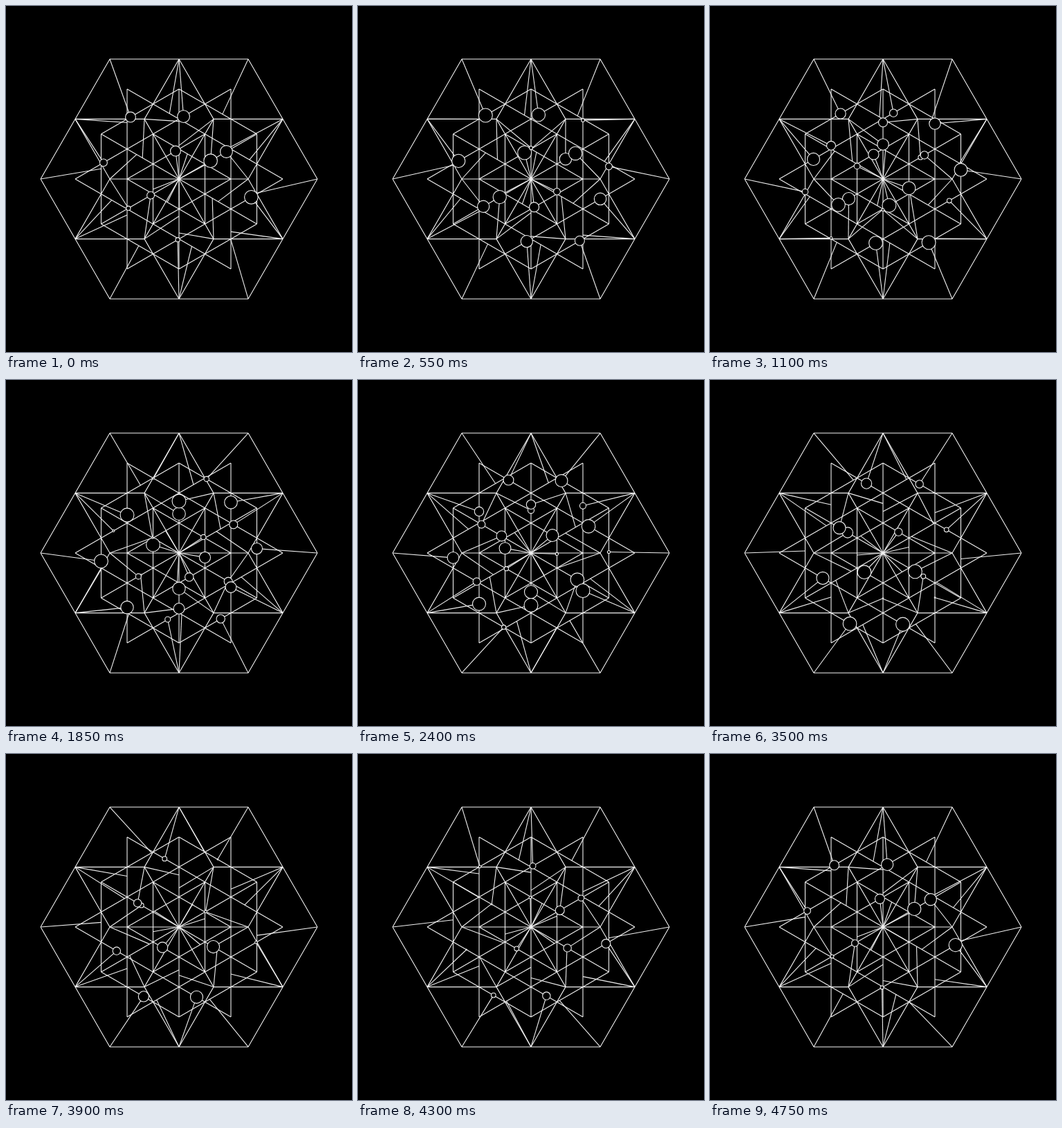
Write an HTML page with a canvas that moves like this. It is 500 px wide and 500 px high and loops after 4800 ms.

```html
<!DOCTYPE html>
<html lang="en">
<head>
<meta charset="utf-8">
<style>
  html, body { margin: 0; width: 100%; height: 100%; overflow: hidden; background: #000; }
  canvas { display: block; }
</style>
</head>
<body>
<canvas id="stage" width="500" height="500"></canvas>
<script>
const ctx = document.getElementById('stage').getContext('2d');
const PERIOD = 4800, LEAD = 0.008, MAX_RADIUS = 10;
const H = 37.5, V = 12.5 * Math.sqrt(3); // lattice steps
const at = (x, y) => [x * H, y * V];

function turn([x, y], sixths) {
  const a = sixths * Math.PI / 3, c = Math.cos(a), s = Math.sin(a);
  return [x * c - y * s, x * s + y * c];
}

// Each pointer hinges at `pivot` and sweeps from `start` to `end`, repeated six times.
const sweeps = [
  { pivot: [0, 0],    start: at(1, 1),  end: at(1, -1), slot: 0, shift: 0 },
  { pivot: [100, 0],  start: at(1, 1),  end: at(2, 2),  slot: 1, shift: 1 },
  { pivot: [100, 0],  start: at(2, -2), end: at(1, -1), slot: 2, shift: -2 },
  { pivot: at(4, 4),  start: at(3, 1),  end: at(2, 2),  slot: 1, shift: 0 },
  { pivot: at(4, 4),  start: at(2, 2),  end: at(2, 4),  slot: 2, shift: 0 },
  { pivot: [200, 0],  start: at(3, -1), end: at(3, 1),  slot: 0, shift: 0 }
];

function phaseOf(slot, k) {
  const i = (3 * (k + 6) + slot + 16) % 18;
  const group = Math.floor(i / 3);
  return [3, 0, 2][(i + group) % 3] / 4 + group / 24;
}

const pointers = sweeps.flatMap(({ pivot, start, end, slot, shift }) =>
  [0, 1, 2, 3, 4, 5].map(k => ({
    pivot: turn(pivot, k),
    start: turn(start, k),
    end: turn(end, k),
    phase: phaseOf(slot, k + shift)
  })));

// Fixed lines, one sixth of the figure.
const frame = [
  [[200, 0], turn([200, 0], 1)],          // outer hexagon
  [at(4, 4), [100, 0]],                   // star outline
  [at(4, -4), [100, 0]],
  [[150, 0], turn([150, 0], 2)],          // large hexagram
  [[75, 0], turn([75, 0], 2)],            // small hexagram
  [at(3, -3), at(3, 3)],                  // middle hexagon
  [[0, 0], [100, 0]],                     // spokes
  [[0, 0], at(3, 3)]
];
const fixedLines = new Path2D();
for (const [a, b] of frame) {
  for (let k = 0; k < 6; k++) {
    fixedLines.moveTo(...turn(a, k));
    fixedLines.lineTo(...turn(b, k));
  }
}

function draw(now) {
  const time = now / PERIOD + LEAD;
  ctx.setTransform(1, 0, 0, 1, 0, 0);
  ctx.fillStyle = '#000';
  ctx.fillRect(0, 0, 500, 500);
  ctx.translate(250, 250);
  ctx.strokeStyle = '#f0f0f0';
  ctx.lineWidth = 1.1;
  ctx.stroke(fixedLines);

  const dots = pointers.map(({ pivot, start, end, phase }) => {
    const p = (time + phase) % 1;
    const x = start[0] + (end[0] - start[0]) * p;
    const y = start[1] + (end[1] - start[1]) * p;
    ctx.beginPath();
    ctx.moveTo(...pivot);
    ctx.lineTo(x, y);
    ctx.stroke();
    return { x, y, r: MAX_RADIUS * Math.sin(2 * Math.PI * p) };
  });

  for (const { x, y, r } of dots) {
    if (r <= 0) continue;
    ctx.beginPath();
    ctx.arc(x, y, r, 0, 2 * Math.PI);
    ctx.fill();
    ctx.stroke();
  }
}

const began = performance.now();
function tick() {
  draw(performance.now() - began);
  requestAnimationFrame(tick);
}
tick();
</script>
</body>
</html>
```
